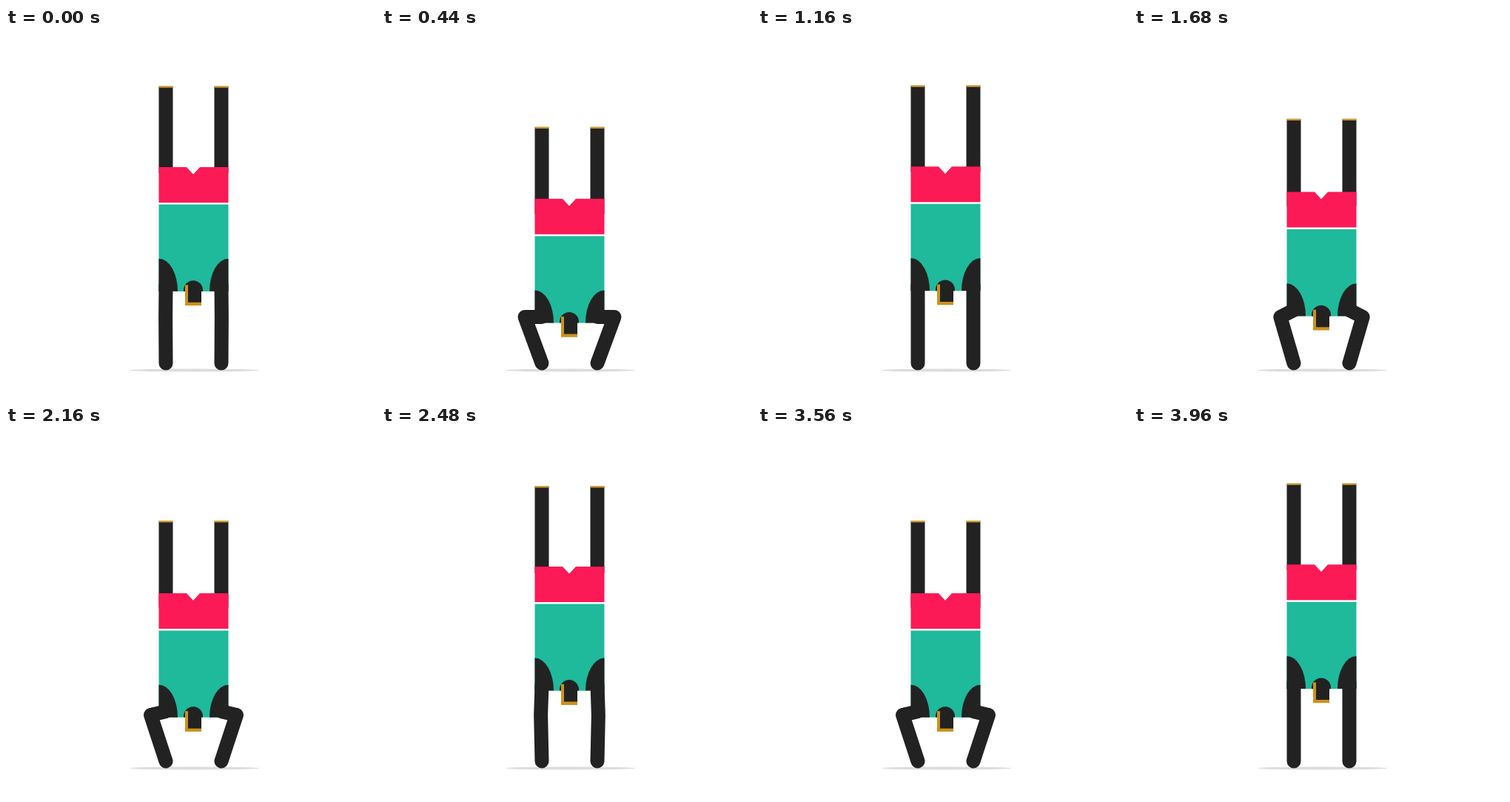
An HTML page that plays this animation: 500 by 500 pixels, repeating every 4200 ms.

```html
<!DOCTYPE html>
<html lang="en">
<head>
<meta charset="utf-8">
<title>Handstand push-ups</title>
<style>
  html, body { margin: 0; height: 100%; overflow: hidden; background: #fff; }
  svg { display: block; width: 100vw; height: 100vh; }
</style>
</head>
<body>
<svg viewBox="0 0 500 500">
  <defs>
    <g id="leg">
      <path fill="#222" d="M206.5 78h19v117h-19z"/>
      <path fill="#d09a34" d="M206.5 77.3h19v2.4h-19z"/>
    </g>
    <path id="shoulder" fill="#222" d="M206.5 311A25.5 44 0 0 1 232 355H206.5z"/>
    <path id="arm" fill="none" stroke="#222" stroke-width="19" stroke-linecap="round" stroke-linejoin="round"/>
  </defs>
  <ellipse cx="254.5" cy="462.5" rx="88" ry="2" fill="#dcdcdc"/>
  <g id="legs">
    <use href="#leg"/>
    <use href="#leg" x="75"/>
  </g>
  <g id="torso">
    <path fill="#fc1a56" d="M206.5 187.3H244L253 197L262 187.3H300.5V235.3H206.5z"/>
    <path fill="#1fb99c" d="M206.5 237.8h94V355.2h-94z"/>
    <use href="#shoulder"/>
    <use href="#shoulder" transform="matrix(-1 0 0 1 507 0)"/>
    <path fill="#222" d="M240 355.2V353.5A13 13 0 0 1 266 353.5V355.2H264V371H244V355.2z"/>
    <path fill="#cb921f" d="M242 346.5h4V370h18v4.3H242z"/>
  </g>
  <use href="#arm"/>
  <use href="#arm" transform="matrix(-1 0 0 1 507 0)"/>
</svg>
<script>
const [legs, torso, arm] = ['legs', 'torso', 'arm'].map(id => document.getElementById(id));
const STEP = 40, PERIOD = 1400, BOTTOM = 580, END = 1200, DEPTH = 44.6;

// cubic-bezier(.33, 0, .36, 1), solved by bisection
function ease(x) {
  let lo = 0, hi = 1;
  for (let i = 0; i < 30; i++) {
    const u = (lo + hi) / 2, v = 1 - u;
    if (3 * v * v * u * .33 + 3 * v * u * u * .36 + u ** 3 < x) lo = u; else hi = u;
  }
  return lo * lo * (3 - 2 * lo);
}

function bend(t) {
  const s = (t + STEP) % PERIOD;
  if (s >= END) return 0;
  return ease(s < BOTTOM ? s / BOTTOM : (END - s) / (END - BOTTOM));
}

function draw(now) {
  const p = bend(Math.floor(now / STEP) * STEP);
  const dy = DEPTH * p;
  const slide = 13 * p * (1.4 - .4 * p); // legs sink a little into the hips
  torso.setAttribute('transform', `translate(0 ${dy})`);
  legs.setAttribute('transform', `translate(0 ${dy + slide})`);
  arm.setAttribute('d', `M216 453L${216 - .53 * dy} 390.5L216 ${347 + dy}`);
}

const start = performance.now();
function tick() {
  draw(performance.now() - start);
  requestAnimationFrame(tick);
}
tick();
</script>
</body>
</html>
```
